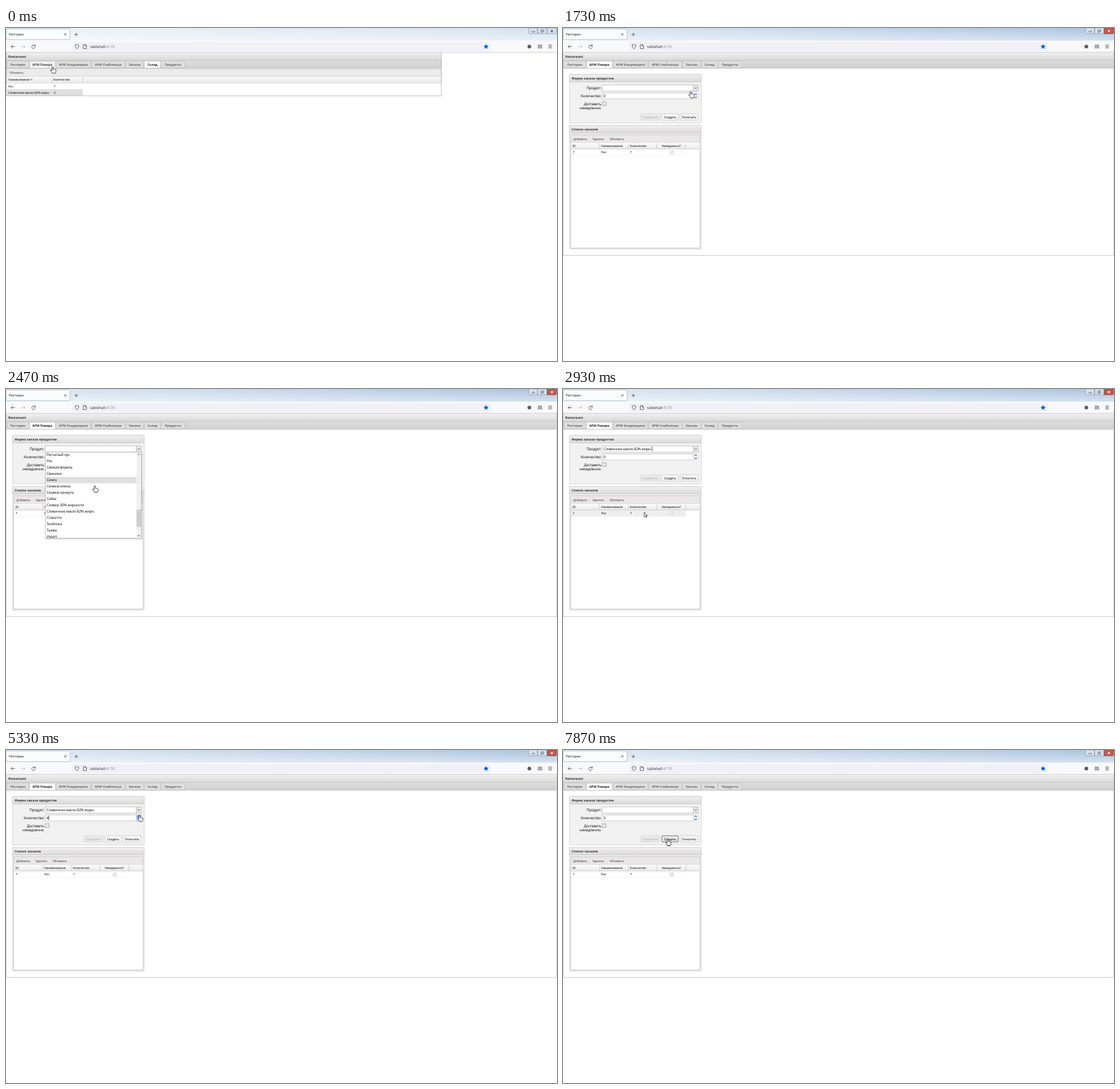
Write an HTML page that moves like this. It is 963x582 px and loops after 8 s.

```html
<!DOCTYPE html>
<html lang="ru">
<head>
<meta charset="utf-8">
<title>Ресторан</title>
<style>
html, body { margin: 0; width: 100%; height: 100%; overflow: hidden; background: #fff; }
svg { display: block; }
text { font: 5.5px "Noto Sans", "Open Sans", sans-serif; letter-spacing: -.04em; fill: #111; text-rendering: geometricPrecision; white-space: pre; }
.bold text, text.bold { font-size: 5.6px; font-weight: 700; letter-spacing: 0; fill: #333; }
.form text { font-size: 6.4px; }
.tabs text { font-size: 5.5px; fill: #666; text-anchor: middle; }
.tabs rect { fill: #dedede; stroke: #bcbcbc; stroke-width: .7; }
.tool text { fill: #444; }
.head text { font-size: 5.35px; }
.buttons rect { fill: #f8f8f8; stroke: #c4c4c4; stroke-width: .8; }
.buttons text { font-size: 5.8px; text-anchor: middle; }
.ui text { letter-spacing: 0; }
.line { fill: none; stroke: #c6c6c6; stroke-width: .8; }
.icon { fill: none; stroke: #4c4c55; stroke-width: .9; stroke-linecap: round; stroke-linejoin: round; }
.field { fill: #fff; stroke: #b9b9b9; stroke-width: .8; }
.end { text-anchor: end; }
.mid { text-anchor: middle; }

/* Hard state changes; 1% is 80 ms. */
.t { animation: 8s step-end infinite; }
.inactive { animation-name: inactive; }
.active { animation-name: active; }
.stock { animation-name: stock; }
.orders { animation-name: orders; }
.tab-on { animation-name: tab-on; }
.tabs .label-on { animation-name: label-on; }
.tab-off { animation-name: tab-off; }
.tabs .label-off { animation-name: label-off; }
.list { animation-name: list; }
.hover { animation-name: hover; }
.chosen { animation-name: chosen; }
.digits { animation-name: digits; }
.spin { animation-name: spin; }
.press { animation-name: press; }
.row { animation-name: row; }
.create { animation-name: create; }
.caret { animation-name: caret; }
.hand { animation-name: hand; }
.arrow { animation-name: arrow; }
.cursor { animation: cursor 8s linear infinite; }

@keyframes inactive { 0% { opacity: 1 } 5.87%, 100% { opacity: 0 } }
@keyframes active { 0% { opacity: 0 } 5.87%, 100% { opacity: 1 } }
@keyframes stock { 0% { opacity: 1 } 7.5%, 100% { opacity: 0 } }
@keyframes orders { 0% { opacity: 0 } 7.5%, 100% { opacity: 1 } }
@keyframes tab-on { 0% { fill: #f1f1f1 } 7.5%, 100% { fill: #fafafa } }
@keyframes label-on { 0% { fill: #444 } 7.5%, 100% { fill: #222 } }
@keyframes tab-off { 0% { fill: #fafafa } 7.5%, 100% { fill: #dedede } }
@keyframes label-off { 0% { fill: #222 } 7.5%, 100% { fill: #666 } }
@keyframes list { 0% { opacity: 0 } 23.37% { opacity: 1 } 35.87%, 100% { opacity: 0 } }
@keyframes hover {
  0% { opacity: 0 }
  27.4% { opacity: 1; transform: none }
  29.1% { opacity: 1; transform: translateY(11px); animation-timing-function: steps(7) }
  34.1%, 100% { opacity: 1; transform: translateY(88px) }
}
@keyframes chosen { 0% { opacity: 0 } 35.87% { opacity: 1 } 98.37%, 100% { opacity: 0 } }
@keyframes digits {
  0% { transform: none }
  51.6% { transform: translateY(-12px) }
  54.1% { transform: translateY(-24px) }
  57.5% { transform: translateY(-36px) }
  60.87% { transform: translateY(-48px) }
  67.5% { transform: translateY(-60px) }
  98.37%, 100% { transform: none }
}
@keyframes spin { 0% { opacity: 0 } 50% { opacity: 1 } 96.6%, 100% { opacity: 0 } }
@keyframes press {
  0%, 51.6%, 54.1%, 57.5%, 60.87%, 67.5%, 100% { opacity: 0 }
  50%, 53.37%, 56.6%, 60%, 66.6% { opacity: 1 }
}
@keyframes row { 0% { opacity: 0 } 36.6% { opacity: 1 } 40.8%, 100% { opacity: 0 } }
@keyframes create {
  0% { stroke: #c4c4c4 }
  76.6% { stroke: #858585; fill: #f4f4f4 }
  96.6%, 100% { stroke: #555; fill: #e6e6e6 }
}
@keyframes caret {
  0% { opacity: 0; transform: translate(71px, 101px) }
  23.37% { opacity: 1; transform: translate(71px, 101px) }
  30% { opacity: 0; transform: translate(71px, 101px) }
  36.6% { opacity: 1; transform: translate(155.6px, 101px) }
  43.4% { opacity: 0; transform: translate(155.6px, 101px) }
  50%, 63.37%, 76.6%, 90% { opacity: 1; transform: translate(74.5px, 115px) }
  56.6%, 70%, 83.37%, 96.6%, 100% { opacity: 0; transform: translate(74.5px, 115px) }
}
@keyframes hand {
  0%, 21.6%, 48.4%, 76.6%, 100% { opacity: 1 }
  14.1%, 36.6%, 70.9% { opacity: 0 }
}
@keyframes arrow {
  0%, 21.6%, 48.4%, 76.6%, 100% { opacity: 0 }
  14.1%, 36.6%, 70.9% { opacity: 1 }
}
@keyframes cursor {
  0%, .8% { transform: translate(81.5px, 67.5px) }
  1.6%, 12% { transform: translate(68.5px, 64.5px) }
  17% { transform: translate(145px, 114px) }
  20% { transform: translate(208px, 127px) }
  22.5%, 25.9% { transform: translate(231.5px, 102px) }
  28.37% { transform: translate(165.5px, 132.5px) }
  34.1%, 38.4% { transform: translate(142px, 215.5px) }
  49.1%, 69.2% { transform: translate(233.5px, 113.5px) }
  74.4% { transform: translate(192px, 170px) }
  77.5% { transform: translate(181.5px, 159.5px) }
  80% { transform: translate(183px, 156.3px) }
  80.87%, 100% { transform: translate(183px, 155.5px) }
}
</style>
</head>
<body>
<svg width="963" height="582" viewBox="0 0 963 582">
  <defs>
    <linearGradient id="glass"><stop stop-color="#dce7f2"/><stop offset=".5" stop-color="#c3d5e9"/><stop offset="1" stop-color="#a9c2de"/></linearGradient>
    <linearGradient id="shine" x2="0" y2="1"><stop stop-color="#fff" stop-opacity="0"/><stop offset="1" stop-color="#fff" stop-opacity=".5"/></linearGradient>
    <linearGradient id="bar" x2="0" y2="1"><stop stop-color="#f1f1f1"/><stop offset="1" stop-color="#d9d9d9"/></linearGradient>
    <linearGradient id="strip" x2="0" y2="1"><stop stop-color="#dedede"/><stop offset="1" stop-color="#cfcfcf"/></linearGradient>
    <linearGradient id="cols" x2="0" y2="1"><stop stop-color="#fbfbfb"/><stop offset="1" stop-color="#e9e9e9"/></linearGradient>
    <clipPath id="digit"><rect x="69" y="113.5" width="20" height="10.5"/></clipPath>
    <clipPath id="popup"><rect x="69" y="110.5" width="168" height="150"/></clipPath>
    <path id="down" d="M-1.8 -.9 0 .9 1.8 -.9" fill="none" stroke="#444" stroke-width="1"/>
  </defs>

  <!-- Browser window -->
  <g class="ui">
    <rect width="963" height="22" fill="url(#glass)"/>
    <rect width="963" height="22" fill="url(#shine)"/>
    <rect class="t inactive" width="963" height="22" fill="#fff" opacity="0" fill-opacity=".5"/>
    <rect x=".4" y="1.6" width="111.6" height="18.6" rx="2" fill="#fbfcfd" stroke="#9fb2c8" stroke-width=".8"/>
    <text x="5" y="13.4" style="font-size:5.75px">Ресторан</text>
    <path class="icon" d="M102 9.4l3.4 3.4m0-3.4l-3.4 3.4M120 11.4h5.6m-2.8-2.8v5.6"/>
    <g fill="#d5e1ee" stroke="#8293a8" stroke-width=".7">
      <path d="M913.5 0V8.5q0 1.5 1.5 1.5H928.7V0zM929.3 0V10H945.2V0z"/>
      <path d="M946 0V10H960.5q1.5 0 1.5-1.5V0z"/>
      <path class="t active" fill="#c9584a" stroke="#7e3a36" d="M946 0V10H960.5q1.5 0 1.5-1.5V0z"/>
      <path d="M919 5.6h5v1.6h-5zM936 3h3.8v3.4H936zM934.6 4.4h3.8v3.2h-3.8z" fill="#fff" stroke="#54606e"/>
      <path d="M952.3 3.7l3.4 3.4m0-3.4l-3.4 3.4" stroke="#54606e" stroke-width="1.4"/>
      <path class="t active" d="M952.3 3.7l3.4 3.4m0-3.4l-3.4 3.4" stroke="#fff" stroke-width="1.3"/>
    </g>
    <rect y="22" width="963" height="20.5" fill="#f9f9fb"/>
    <rect x="116" y="24.5" width="731" height="15.5" rx="2" fill="#f1f1f5"/>
    <path class="icon" d="M15.2 32.5H9m2.6-2.7L8.9 32.5l2.7 2.7"/>
    <path class="icon" style="stroke:#bdbdc2" d="M27 32.5h6.2m-2.6-2.7l2.7 2.7-2.7 2.7"/>
    <path class="icon" d="M50.8 31.2a3.1 3.1 0 1 0 .3 2.4M51.2 29v2.4h-2.5"/>
    <path class="icon" d="M124 28.8l3.2 1.1q.1 4.6-3.2 6.4q-3.3-1.8-3.2-6.4zM135.5 29h3.2l2 2v5h-5.2zM138.5 29v2.2h2.2"/>
    <text x="147" y="34.9" style="font-size:6.5px;fill:#333">tablehall<tspan fill="#85858c">:4170</tspan></text>
    <path fill="#0b5fdf" d="M839 28l1.35 2.8 3.05.4-2.25 2.1.55 3.05-2.7-1.5-2.7 1.5.55-3.05-2.25-2.1 3.05-.4z"/>
    <circle cx="914.7" cy="32.4" r="3.2" fill="#5b5b66"/>
    <path class="icon" d="M930.2 29.3v6.2m2-6.2v6.2m2-6.2v6.2m1-6l1.6 6M948.2 29.8h5.6m-5.6 2.5h5.6m-5.6 2.5h5.6"/>
  </g>

  <!-- Page frame and tabs -->
  <rect x=".4" y="42.5" width="962.2" height="14" fill="url(#bar)" stroke="#c2c2c2" stroke-width=".8"/>
  <text class="bold" x="4" y="51.7">Restaraunt</text>
  <rect x=".4" y="56.5" width="962.2" height="13.8" fill="url(#strip)" stroke="#c2c2c2" stroke-width=".8"/>
  <g class="bold tabs">
    <rect x="1.5" y="58" width="38.5" height="11.5"/><text x="20.8" y="66.1">Ресторан</text>
    <rect class="t tab-on" x="41" y="58" width="45.6" height="12.3"/><text class="t label-on" x="63.4" y="66.1">АРМ Повара</text>
    <rect x="87.6" y="58" width="61" height="11.5"/><text x="117.8" y="66.1">АРМ Кладовщика</text>
    <rect x="149.6" y="58" width="58.4" height="11.5"/><text x="178.5" y="66.1">АРМ Снабженца</text>
    <rect x="209" y="58" width="31.8" height="11.5"/><text x="224.8" y="66.1">Заказы</text>
    <rect class="t tab-off" x="241.8" y="58" width="28.4" height="12"/><text class="t label-off" x="256" y="66.1">Склад</text>
    <rect x="271.2" y="58" width="41" height="11.5"/><text x="291.8" y="66.1">Продукты</text>
  </g>

  <!-- Stock view -->
  <g class="t stock">
    <rect x="761.4" y="43" width="202" height="80" fill="#fff"/>
    <rect x="1" y="71" width="759.5" height="13.5" fill="#ebebeb" stroke="#c8c8c8" stroke-width=".8"/>
    <g class="tool"><text x="5.5" y="80">Обновить</text></g>
    <rect x="1" y="84.5" width="759.5" height="11.7" fill="url(#cols)" stroke="#cdcdcd" stroke-width=".7"/>
    <path class="line" d="M80.5 85V96M134.3 85V96"/>
    <g class="head"><text x="4" y="92.2">Наименование</text><text x="83" y="92.2">Количество</text></g>
    <path d="M43 91l1.8-2 1.8 2z" fill="#555"/>
    <rect x="1.3" y="107" width="133" height="11.2" fill="#dfdfdf"/>
    <text x="4" y="103.8">Рис</text><text x="83.6" y="103.8">7</text>
    <text x="4" y="114.6">Сливочное масло 82% жирн.</text><text x="83.6" y="114.6">2</text>
    <path class="line" style="stroke:#aaa" d="M.5 43V118.6H760.9V43"/>
  </g>

  <!-- Orders view -->
  <g class="t orders">
    <path class="line" style="stroke:#b8b8b8" d="M.4 70V397.6H962.6V70"/>
    <rect x="11.4" y="81" width="230.2" height="85" rx="1" fill="#f1f1f1" stroke="#cacaca" stroke-width=".8"/>
    <rect x="11.4" y="81" width="230.2" height="13.3" rx="1" fill="url(#bar)" stroke="#cacaca" stroke-width=".8"/>
    <text class="bold" x="15" y="89.8">Форма заказа продуктов</text>
    <g class="form">
      <g class="end">
        <text x="66.8" y="107.3">Продукт:</text><text x="66.8" y="121">Количество:</text>
        <text x="66.8" y="134.6">Доставить</text><text x="66.8" y="141.6">немедленно:</text>
      </g>
      <rect class="field" x="68.8" y="99.6" width="159" height="10.6"/>
      <rect x="227.8" y="99.6" width="8.4" height="10.6" fill="#e6e6e6" stroke="#b9b9b9" stroke-width=".8"/>
      <use href="#down" x="232" y="105"/>
      <text class="t chosen" x="71" y="107.3">Сливочное масло 82% жирн.</text>
      <rect class="field" x="68.8" y="113.4" width="159" height="10.6"/>
      <rect x="227.8" y="113.4" width="8.4" height="10.6" fill="#f5f7fb" stroke="#d0d0d0" stroke-width=".6"/>
      <rect class="t spin" x="227.8" y="113.4" width="8.4" height="10.6" fill="#d6e6f8" stroke="#a9c0dc" stroke-width=".6"/>
      <rect class="t press" x="227.8" y="113.4" width="8.4" height="5.3" fill="#9fc1e8"/>
      <path d="M229.8 117.2l2.2-2 2.2 2M229.8 120.2l2.2 2 2.2-2" fill="none" stroke="#34598f" stroke-width="1.1"/>
      <g clip-path="url(#digit)">
        <g class="t digits">
          <text x="70.8" y="121">0</text><text x="70.8" y="133">1</text><text x="70.8" y="145">2</text>
          <text x="70.8" y="157">3</text><text x="70.8" y="169">4</text><text x="70.8" y="181">5</text>
        </g>
      </g>
      <rect x="69" y="129" width="6.2" height="6.2" fill="#eee" stroke="#8c8c8c" stroke-width=".8"/>
    </g>
    <g class="buttons">
      <g opacity=".55"><rect x="135.4" y="149.8" width="34.6" height="11" rx="1" style="fill:#e2e2e2"/><text x="152.5" y="157.5" style="fill:#777">Сохранить</text></g>
      <rect class="t create" x="173" y="149.8" width="28.4" height="11" rx="1"/><text x="187" y="157.5">Создать</text>
      <rect x="204.7" y="149.8" width="31.5" height="11" rx="1"/><text x="220.3" y="157.5">Очистить</text>
    </g>

    <rect x="11.4" y="170.4" width="230.2" height="216" rx="1" fill="#efefef" stroke="#cacaca" stroke-width=".8"/>
    <rect x="11.4" y="170.4" width="230.2" height="13" rx="1" fill="url(#bar)" stroke="#cacaca" stroke-width=".8"/>
    <text class="bold" x="15" y="179.2">Список заказов</text>
    <rect x="13.6" y="186.4" width="225.6" height="198" fill="#fff" stroke="#bdbdbd" stroke-width=".8"/>
    <rect x="13.6" y="186.4" width="225.6" height="13.8" fill="#e9e7e7" stroke="#c9c4c4" stroke-width=".8"/>
    <g class="tool"><text x="18" y="195.6">Добавить</text><text x="51.5" y="195.6">Удалить</text><text x="81.3" y="195.6">Обновить</text></g>
    <rect x="14" y="200.5" width="224.8" height="11" fill="url(#cols)"/>
    <path class="line" d="M14 211.5H239M64 200.5V211.5M114 200.5V211.5M164.3 200.5V211.5M214.4 200.5V211.5"/>
    <g class="head">
      <text x="16.6" y="207.6">ID</text><text x="66.8" y="207.6">Наименование</text>
      <text x="116.8" y="207.6">Количество</text><text class="mid" x="189" y="207.6">Немедленно?</text>
    </g>
    <rect class="t row" x="14" y="212" width="200.5" height="10.4" fill="#eee"/>
    <path d="M14 222.5H214.5" stroke="#ececec" stroke-width=".7"/>
    <text x="16.8" y="219.2">7</text><text x="66.8" y="219.2">Рис</text><text x="117" y="219.2">7</text>
    <rect x="187" y="214.6" width="5.8" height="5.8" fill="#f3f3f3" stroke="#ccc" stroke-width=".7"/>
    <path d="M188.3 217.5l1.2 1.3 2-2.8" fill="none" stroke="#bbb" stroke-width=".8"/>
  </g>

  <!-- Product list -->
  <g class="t list form">
    <rect x="70" y="111.5" width="168.2" height="151" rx="1" opacity=".18"/>
    <rect x="68.8" y="110.3" width="167.8" height="150.6" fill="#fff" stroke="#a5a5a5" stroke-width=".8"/>
    <g clip-path="url(#popup)">
      <rect class="t hover" x="69.2" y="120.7" width="159" height="11" fill="#dfdfdf"/>
      <text x="71" y="117.4">Репчатый лук</text><text x="71" y="128.4">Рис</text>
      <text x="71" y="139.4">Свежая форель</text><text x="71" y="150.4">Свинина</text>
      <text x="71" y="161.4">Семга</text><text x="71" y="172.4">Семена киноа</text>
      <text x="71" y="183.4">Семена кунжута</text><text x="71" y="194.4">Сибас</text>
      <text x="71" y="205.4">Сливки 30% жирности</text><text x="71" y="216.4">Сливочное масло 82% жирн.</text>
      <text x="71" y="227.4">Спагетти</text><text x="71" y="238.4">Телятина</text>
      <text x="71" y="249.4">Тыква</text><text x="71" y="260.4">Укроп</text>
    </g>
    <rect x="228" y="110.7" width="8.3" height="149.8" fill="#f0f0f0"/>
    <rect x="228" y="211" width="8.3" height="30" fill="#cdcdcd"/>
    <use href="#down" transform="translate(232 114.3) scale(1 -1)"/><use href="#down" x="232" y="256.3"/>
  </g>

  <rect class="t caret" x="-.35" width=".8" height="7.2"/>
  <g class="cursor" stroke="#111" stroke-width=".8" stroke-linejoin="round" fill="#fff">
    <path class="t hand" d="M-1.1 .9Q0-.6 1.1.9V4.6Q2.1 3.7 2.8 4.7 3.9 4.1 4.4 5.2 5.6 4.8 5.8 6V8.2L4.8 10V11.5H-1V10.2L-3.6 7Q-4 5.5-2.8 5.6L-1.1 7Z"/>
    <path class="t arrow" d="M0 0V8L1.9 6.3 3 8.9 4.3 8.4 3.2 5.9H5.6Z"/>
  </g>
</svg>
</body>
</html>
```
